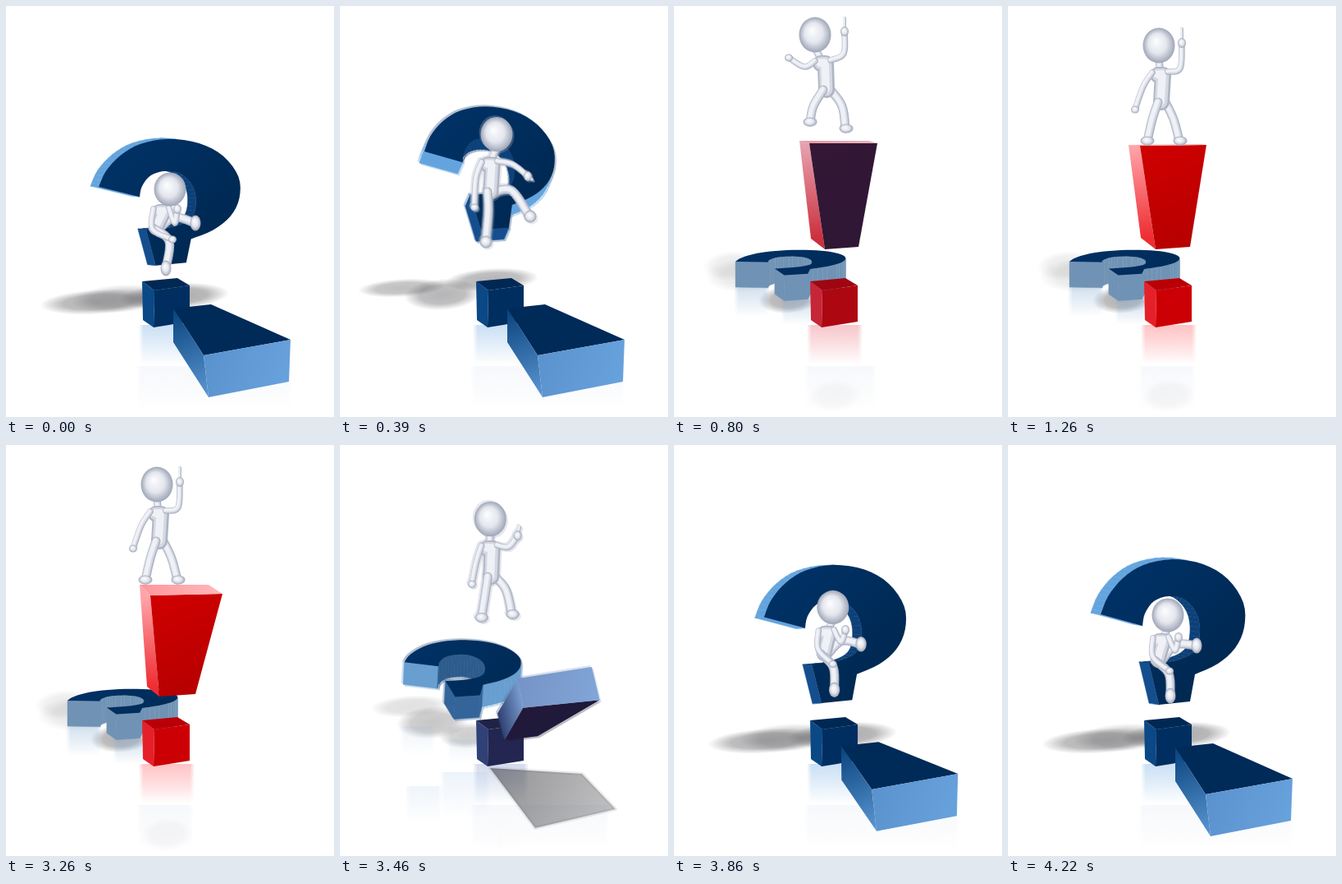
Animation, 400 px wide and 500 px high, one loop 6.62 s. Source, as an HTML page with a canvas:

```html
<!DOCTYPE html>
<html>
<head>
<meta charset="utf-8">
<style>
html, body { margin: 0; width: 100%; height: 100%; overflow: hidden; background: #fff; }
canvas { display: block; }
</style>
</head>
<body>
<canvas id="stage" width="400" height="500"></canvas>
<script>
const ctx = document.getElementById('stage').getContext('2d');
const LOOP = 6620;
const STEPS = [0, 100, 190, 290, 390, 470, 550, 630, 710, 800, 900, 1010, 1130, 1260,
  3260, 3360, 3460, 3560, 3660, 3760, 3860, 3980, 4100, 4220];

const lerp = (a, b, p) => a + (b - a) * p;
const mix = (a, b, p) => a.map((v, i) => lerp(v, b[i], p));
const rgb = (c, a = 1) => `rgba(${c.map(Math.round)},${a})`;

function pairs(list) {
  const out = [];
  for (let i = 0; i < list.length; i += 2) out.push([list[i], list[i + 1]]);
  return out;
}

// A track is a list of [time, values]
function at(track, t) {
  const next = track.findIndex(k => k[0] > t);
  if (next < 0) return track[track.length - 1][1];
  if (next === 0) return track[0][1];
  const [t0, a] = track[next - 1], [t1, b] = track[next];
  return mix(a, b, (t - t0) / (t1 - t0));
}

function spline(points, n = 4) {
  const out = [], last = points.length - 1;
  for (let i = 0; i < last; i++) {
    const a = points[Math.max(i - 1, 0)], b = points[i], c = points[i + 1];
    const d = points[Math.min(i + 2, last)];
    for (let k = 0; k < n; k++) {
      const u = k / n;
      out.push([0, 1].map(j => 0.5 * (2 * b[j] + (c[j] - a[j]) * u
        + (2 * a[j] - 5 * b[j] + 4 * c[j] - d[j]) * u * u
        + (3 * b[j] - a[j] - 3 * c[j] + d[j]) * u ** 3)));
    }
  }
  out.push(points[last]);
  return out;
}

function poly(points, fill) {
  ctx.beginPath();
  points.forEach(([x, y]) => ctx.lineTo(x, y));
  ctx.closePath();
  ctx.fillStyle = fill;
  ctx.fill();
}

function gradient(a, b, from, to) {
  const g = ctx.createLinearGradient(...a, ...b);
  g.addColorStop(0, from);
  g.addColorStop(1, to);
  return g;
}

// Faint offset copies under the sharp one soften a moving part
function smear(on, draw) {
  if (on) {
    for (const [x, y] of [[-2, -2], [2, 2]]) {
      ctx.save();
      ctx.globalAlpha = 0.3;
      ctx.translate(x, y);
      draw();
      ctx.restore();
    }
  }
  draw();
}

// Hook of the question mark, measured from its left tip
const OUTER = spline(pairs([0, 0, 9, -22, 27, -44, 52, -60, 87, -67, 125, -61, 155, -43,
  174, -14, 175, 16, 164, 41, 143, 60, 115, 73]));
const INNER = spline(pairs([59, 60, 92, 56, 115, 44, 121, 22, 117, -1, 102, -18, 83, -22, 65, -16, 54, -1, 51, 14]));
const HOOK = [...OUTER, [109, 106], [71, 110], ...INNER];
const STEM_END = OUTER.length + 2, INNER_END = HOOK.length - 1;

// x, y, matrix a b c d, depth x y, flatness
const hookUp = [113, 206, 1, 0, 0, 1, -12, -2, 0];
const hookLow = [113, 220, 0.98, 0, 0, 0.87, -10, -1, 0];
const hookTilt = [103, 177, 0.9, 0.046, 0.025, 0.85, -6, 14, 0];
const hookLean = [80, 241, 0.83, 0.04, 0, 0.5, -2, 25, 0];
const hookFlat = [75, 311, 0.76, 0.05, -0.03, 0.17, 0, 31, 1];
const hookTrack = [[0, hookLow], [390, hookTilt], [710, hookFlat], [3260, hookFlat],
  [3560, hookLean], [3860, mix(hookLean, hookUp, 0.9)], [4220, hookUp]];

function drawHook(t) {
  const [x, y, a, b, c, d, dx, dy, flat] = at(hookTrack, t);
  const face = HOOK.map(([u, v]) => [x + a * u + b * v, y + c * u + d * v]);
  const walls = [];
  face.forEach((p, i) => {
    const q = face[(i + 1) % face.length];
    if ((q[1] - p[1]) * dx - (q[0] - p[0]) * dy <= 0) return;
    const dark = i >= OUTER.length - 1 && i < INNER_END;
    const base = !dark ? [100, 164, 222] : i < STEM_END ? [20, 78, 142] : [12, 64, 120];
    walls.push({ p, q, fill: rgb(mix(base, [112, 147, 181], flat)), depth: (p[0] + q[0]) * dx + (p[1] + q[1]) * dy });
  });
  walls.sort((m, n) => m.depth - n.depth);
  for (const { p, q, fill } of walls) {
    poly([p, q, [q[0] + dx, q[1] + dy], [p[0] + dx, p[1] + dy]], fill);
    ctx.strokeStyle = fill;
    ctx.lineWidth = 0.5;
    ctx.stroke();
  }
  poly(face, gradient([x, y - 60], [x + 150, y + 80], '#00336a', '#002850'));
}

// Bar corners: wide end TL TR BR BL, narrow end TL TR BR BL
const barLying = [241, 425, 347, 406, 345, 457, 247, 476, 204, 368, 250, 363, 250, 400, 204, 409];
const barSwing = [244, 341, 337, 320, 343, 375, 247, 388, 202, 343, 242, 338, 246, 380, 208, 386];
const barRise = [153, 164, 238, 164, 248, 167, 165, 167, 167, 283, 210, 282, 225, 293, 184, 296];
const barStand = [147, 169, 235, 168, 242, 169, 161, 170, 162, 282, 205, 281, 222, 293, 180, 296];
const barTip = [163, 170, 247, 170, 264, 181, 176, 183, 172, 294, 215, 292, 231, 303, 187, 306];
const barTrack = [[390, barLying], [600, barSwing], [800, barRise], [1010, barTip], [1260, barStand],
  [3259, barStand], [3260, barTip], [3560, barSwing], [3860, mix(barSwing, barLying, 0.93)], [4220, barLying]];

// Redness of the front, and of everything else
const redTrack = [[600, [0, 0]], [800, [0.25, 0.85]], [1010, [1, 1]], [3260, [1, 1]], [3500, [0, 0]]];

function drawBar(t, [slow, fast]) {
  const v = pairs(at(barTrack, t));
  const quad = (ids, fill) => {
    const q = ids.map(i => v[i]);
    const area = q.reduce((s, p, i) => {
      const n = q[(i + 1) % 4];
      return s + p[0] * n[1] - n[0] * p[1];
    }, 0);
    if (area > 0) poly(q, fill);
  };
  const tone = (blue, red, p = fast) => rgb(mix(blue, red, p));
  quad([4, 5, 1, 0], tone([0, 42, 88], [190, 0, 0]));
  quad([4, 0, 3, 7], gradient(v[4], v[3], tone([8, 66, 124], [238, 45, 50]), tone([92, 152, 212], [255, 165, 170])));
  quad([3, 2, 6, 7], gradient(v[3], v[6], tone([0, 30, 70], [208, 0, 0], slow), tone([0, 30, 70], [182, 0, 0], slow)));
  quad([0, 1, 2, 3], gradient(v[0], v[2], tone([90, 146, 206], [255, 150, 155]), tone([104, 162, 220], [255, 185, 188])));
}

function drawDot(red) {
  const tone = (blue, hot) => rgb(mix(blue, hot, red));
  poly([[166, 335], [209, 331], [224, 340], [181, 346]], tone([0, 40, 84], [186, 0, 6]));
  poly([[166, 335], [181, 346], [180, 391], [167, 382]], tone([10, 72, 134], [230, 32, 42]));
  poly([[181, 346], [224, 340], [224, 384], [180, 391]], tone([0, 46, 96], [204, 0, 4]));
}

// Three ellipses: x, y, rx, ry, alpha
const shadeUp = [112, 360, 66, 10, 0.42, 205, 353, 62, 11, 0.45, 140, 356, 55, 12, 0.25];
const shadeTilt = [75, 343, 48, 6, 0.35, 185, 333, 52, 9, 0.4, 125, 351, 42, 14, 0.4];
const shadeFlat = [72, 316, 32, 13, 0.1, 140, 357, 32, 12, 0.42, 88, 327, 45, 16, 0.12];
const shadeLean = [93, 319, 50, 6, 0.2, 165, 352, 30, 10, 0.2, 125, 343, 36, 14, 0.4];
const shadeTrack = [[0, shadeUp], [390, shadeTilt], [710, shadeFlat], [3260, shadeFlat], [3560, shadeLean], [3860, shadeUp]];
const castTrack = [[390, [0]], [600, [0.55]], [800, [0]], [3260, [0]], [3560, [0.6]], [3860, [0]]];

function disc(x, y, rx, ry, tilt, g) {
  ctx.save();
  ctx.translate(x, y);
  ctx.rotate(tilt);
  ctx.scale(rx, ry);
  ctx.fillStyle = g;
  ctx.beginPath();
  ctx.arc(0, 0, 1, 0, 7);
  ctx.fill();
  ctx.restore();
}

function softDisc(x, y, rx, ry, color, alpha) {
  const g = ctx.createRadialGradient(0, 0, 0, 0, 0, 1);
  g.addColorStop(0, rgb(color, alpha));
  g.addColorStop(0.6, rgb(color, alpha * 0.85));
  g.addColorStop(1, rgb(color, 0));
  disc(x, y, rx + 5, ry + 5, -0.06, g);
}

// Downward fade with soft sides
function fade(x, y, w, h, color, alpha) {
  ctx.fillStyle = gradient([0, y], [0, y + h], rgb(color, alpha / 3), rgb(color, 0));
  for (const inset of [-2, 0, 2]) ctx.fillRect(x + inset, y, w - 2 * inset, h);
}

function drawFloor(t, red) {
  const flat = at(hookTrack, t)[8], [cast] = at(castTrack, t);
  const s = at(shadeTrack, t);
  for (let i = 0; i < 15; i += 5) softDisc(s[i], s[i + 1], s[i + 2], s[i + 3], [70, 70, 74], s[i + 4]);
  fade(165, 388, 62, 48, mix([130, 180, 230], [255, 110, 115], red), 0.5);
  fade(76, 342, 38, 36, [130, 170, 210], 0.4 * flat);
  fade(133, 358, 34, 30, [130, 170, 210], 0.4 * flat);
  fade(162, 438, 184 - 120 * red, 55, [222, 229, 240], 0.3);
  softDisc(196, 474, 28, 15, [225, 225, 230], 0.35 * red);
  fade(82, 415, 40, 45, [170, 200, 235], 0.5 * cast);
  fade(125, 398, 55, 55, [170, 200, 235], 0.6 * cast);
  if (cast) {
    poly([[183, 393], [295, 400], [336, 443], [238, 466]],
      gradient([190, 395], [320, 450], rgb([60, 60, 66], cast * 1.4), rgb([90, 90, 95], cast)));
    ctx.strokeStyle = rgb([90, 90, 95], cast * 0.3);
    ctx.lineWidth = 4;
    ctx.stroke();
  }
}

// head, chest, hip, left elbow + hand, right elbow + hand, left knee + foot, right knee + foot, finger tip, sitting
const sitLow = [200, 223, 190, 250, 183, 270, 179, 272, 203, 284, 206, 264, 209, 247, 199, 286, 195, 319, 206, 257, 230, 264, 209, 244, 1];
const leap = [191, 156, 183, 193, 184, 226, 166, 210, 164, 245, 211, 193, 229, 207, 181, 250, 178, 287, 210, 225, 231, 256, 234, 211, 0.5];
const jump = [172, 35, 182, 70, 186, 102, 159, 74, 140, 63, 207, 58, 208, 31, 170, 122, 166, 141, 205, 122, 209, 149, 208, 15, 0];
const point = [184, 48, 186, 84, 187, 117, 165, 98, 155, 126, 210, 76, 212, 45, 176, 138, 170, 164, 202, 138, 209, 164, 212, 28, 0];
const drop = [183, 111, 181, 147, 183, 182, 167, 165, 164, 191, 204, 148, 219, 143, 178, 202, 174, 233, 203, 196, 210, 227, 223, 136, 0.2];
const sitUp = [195, 207, 187, 238, 183, 262, 177, 258, 197, 275, 204, 250, 208, 234, 196, 278, 198, 305, 205, 243, 229, 244, 208, 231, 1];
const poseTrack = [[0, sitLow], [390, leap], [800, jump], [1260, point], [3260, point],
  [3560, drop], [3860, mix(drop, sitUp, 0.9)], [4220, sitUp]];

function limb(points, width) {
  ctx.lineCap = ctx.lineJoin = 'round';
  const layers = [['#aeb4c3', 1, 0], ['#d4d8e2', 0.78, 0.4], ['#eff1f6', 0.48, 0.9]];
  for (const [color, part, off] of layers) {
    ctx.beginPath();
    points.forEach(([x, y]) => ctx.lineTo(x - off, y - off));
    ctx.strokeStyle = color;
    ctx.lineWidth = width * part;
    ctx.stroke();
  }
}

function ball(x, y, rx, ry) {
  const g = ctx.createRadialGradient(-0.2, -0.25, 0.05, 0, 0, 1);
  g.addColorStop(0, '#fbfcfe');
  g.addColorStop(0.55, '#e3e6ed');
  g.addColorStop(1, '#9ea5b6');
  disc(x, y, rx, ry, 0, g);
}

function drawFigure(t) {
  const pose = at(poseTrack, t), sit = pose[24];
  const [head, chest, hip, elbowL, handL, elbowR, handR, kneeL, footL, kneeR, footR, tip] = pairs(pose.slice(0, 24));
  const shift = ([x, y], dx, dy = 0) => [x + dx, y + dy];
  const curve = (...p) => spline(p, 6);
  const footW = 8.5 - 2 * sit, footH = 5.5 + 4 * sit;
  limb([shift(head, 0, 16), chest], 9);
  limb(curve(shift(hip, 5), kneeR, footR), 11);
  limb([shift(chest, -3), shift(chest, 3), hip], 20 - 2 * sit);
  limb(curve(shift(hip, -4), kneeL, footL), 11);
  limb(curve(shift(chest, 9, -4), elbowR, handR), 7.5);
  limb(curve(shift(chest, -10, -3), elbowL, handL), 7.5);
  ball(...footL, footW, footH);
  ball(...shift(footR, 1), footW, footH);
  ball(...handL, 5, 4.5);
  limb([handR, tip], 4);
  ball(...handR, 5, 6);
  ball(...head, 19.5, 21.5 - sit);
}

function draw(t) {
  const moving = (t > 200 && t < 710) || (t > 3300 && t < 3800);
  const red = at(redTrack, t);
  ctx.fillStyle = '#fff';
  ctx.fillRect(0, 0, 400, 500);
  drawFloor(t, red[1]);
  smear(moving, () => drawHook(t));
  drawDot(red[1]);
  smear(moving && t > 390, () => drawBar(t, red));
  smear(moving, () => drawFigure(t));
}

let shown = -1;
function tick() {
  const clock = (performance.now() % LOOP + LOOP) % LOOP;
  const step = STEPS.filter(s => s <= clock).pop();
  if (step !== shown) draw(shown = step);
  requestAnimationFrame(tick);
}
tick();
</script>
</body>
</html>
```
